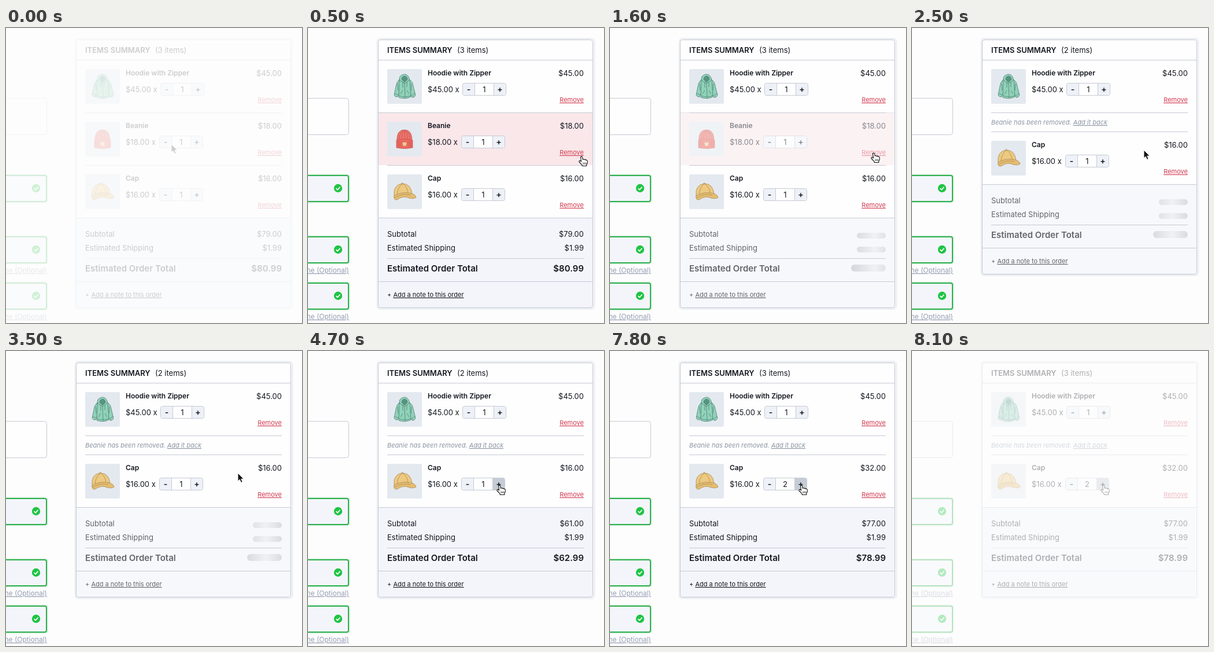
An HTML page that plays this animation: 512x510 px, repeating every 8200 ms.

```html
<!DOCTYPE html>
<html lang="en">
<head>
<meta charset="utf-8">
<title>Order summary</title>
<style>
  html, body { margin: 0; width: 100%; height: 100%; overflow: hidden; background: #fdfdfd; }
  svg { display: block; width: 512px; height: 510px; }
  text { font: 400 13px Inter, "Liberation Sans", sans-serif; fill: #14171f; white-space: pre; }
  .name { font-size: 12px; font-weight: 600; }
  .head { font-weight: 600; }
  .total { font-size: 15px; font-weight: 600; }
  .small { font-size: 11px; }
  .link { text-decoration: underline; }
  .remove { font-size: 11px; fill: #d33a50; text-decoration: underline; }
  .notice { font-size: 11px; font-style: italic; fill: #8a93a3; }
  .field { font-size: 12px; fill: #959db2; text-decoration: underline; }
  .sign { font-size: 14px; font-weight: 600; }
  .end { text-anchor: end; }
  .mid { text-anchor: middle; }
  .line { stroke: #c6cad3; fill: none; }
</style>
</head>
<body>
<svg viewBox="0 0 512 510">
  <defs>
    <linearGradient id="shimmer" gradientUnits="userSpaceOnUse" x1="0" y1="0" x2="80" y2="0" spreadMethod="repeat">
      <stop offset="0" stop-color="#f0f1f5"/>
      <stop offset=".45" stop-color="#d2d4da"/>
      <stop offset="1" stop-color="#f0f1f5"/>
    </linearGradient>
  </defs>
  <g id="stage"></g>
</svg>
<script>
const LOOP = 8200, SHIFT = 58;
const $ = id => document.getElementById(id);

const text = (x, y, str, cls = '', id = '') =>
  `<text x="${x}" y="${y}" class="${cls}" id="${id}">${str}</text>`;
const rect = (x, y, w, h, fill, extra = '') =>
  `<rect x="${x}" y="${y}" width="${w}" height="${h}" fill="${fill}" ${extra}/>`;
const rule = (y, x1 = 137, x2 = 477) => `<path class="line" d="M${x1} ${y + .5}H${x2}"/>`;

const art = {
  hoodie: `<g fill="#8fd2b9" stroke="#527f73" stroke-width=".8" stroke-linejoin="round">
    <path d="M21 18Q16 22 15 30L12 45Q14 49 18 48L23 35Z"/>
    <path d="M38 18Q44 21 45 29L49 45Q47 50 43 49L37 35Z"/>
    <path d="M21 18Q30 23 39 18L41 48Q31 53 20 49Z"/>
    <path d="M22 20Q19 13 26 10Q32 7 36 12Q40 17 37 20L30 25Z"/>
    <path d="M25 18Q25 13 30 12Q35 13 35 18L30 23Z" fill="#579482"/>
    <path d="M30 24L31 50M27 22V32M34 22V31M23 43L27 37M38 43L34 37M20 46Q31 50 41 46M13 42L19 45M43 46L48 42M18 25L19 37M42 25L41 37" fill="none"/></g>`,
  beanie: `<g fill="#ed756b" stroke="#b9504c" stroke-width=".7">
    <path d="M17 36Q15 14 30 14Q44 14 43 36Z"/>
    <path d="M20 34Q20 21 27 16M25 34Q24 22 29 15M30 34V15M35 34Q36 22 31 15M40 34Q40 21 33 16" fill="none"/>
    <path d="M16 32Q30 28 44 32V45Q30 48 16 45Z" fill="#ee6960"/>
    <path d="M19 33V44M22 33V44M38 33V44M41 33V44" fill="none"/>
    <path d="M26 35H34V39Q33 43 30 43Q27 43 26 39Z" fill="#f1c694"/></g>`,
  cap: `<g fill="#edc981" stroke="#a98b58" stroke-width=".8" stroke-linejoin="round">
    <path d="M12 37Q10 18 26 16Q41 16 43 34Q28 29 12 40Z"/>
    <path d="M12 37Q26 29 42 33Q49 35 50 40Q46 43 38 41Q28 36 17 44Q11 45 12 37Z" fill="#e5bd70"/>
    <path d="M26 16Q18 23 17 35M27 16Q35 22 36 32M13 41Q25 32 40 36" fill="none"/>
    <circle cx="26" cy="16" r="1.2"/></g>`
};

const stepper = (x, y, key) => `
  ${rect(x + .5, y + .5, 75, 21, '#fefefe', 'rx="3"')}
  <path d="M${x + 21} ${y + 1}H${x + 3}Q${x + 1} ${y + 1} ${x + 1} ${y + 3}V${y + 19}Q${x + 1} ${y + 21} ${x + 3} ${y + 21}H${x + 21}Z" fill="#eef1f8"/>
  <path id="${key}Plus" d="M${x + 54} ${y + 1}H${x + 73}Q${x + 75} ${y + 1} ${x + 75} ${y + 3}V${y + 19}Q${x + 75} ${y + 21} ${x + 73} ${y + 21}H${x + 54}Z" fill="#eef1f8"/>
  <path class="line" d="M${x + 21.5} ${y}V${y + 22}M${x + 54.5} ${y}V${y + 22}"/>
  ${rect(x + .5, y + .5, 75, 21, 'none', 'rx="3" stroke="#c6cad3"')}
  ${text(x + 11, y + 15.5, '-', 'sign mid')}${text(x + 38, y + 15.5, '1', 'mid', key + 'Qty')}${text(x + 65, y + 16, '+', 'sign mid')}`;

const item = (y, key, name, price, stepX) => `
  ${rect(137, y + 15, 60, 60, '#e4e9f0', 'rx="2"')}
  <g transform="translate(137 ${y + 15})">${art[key]}</g>
  ${text(207, y + 26, name, 'name')}
  ${text(207, y + 55, `$${price} x`)}
  ${stepper(stepX, y + 39, key)}
  ${text(477, y + 27, '$' + price, 'end', key + 'Price')}
  ${text(477, y + 72, 'Remove', 'remove end')}`;

const field = y => `
  ${rect(-10, y - 1, 82, 49, 'none', 'rx="5" stroke="#dff3e4" stroke-width="2"')}
  ${rect(-10, y + 1, 80, 45, '#f3f5fb', 'rx="3" stroke="#2aae4b" stroke-width="2"')}
  <circle cx="52" cy="${y + 23}" r="7.2" fill="#20c444"/>
  <path d="M48.6 ${y + 23.2}l2.5 2.5 4.4-5" fill="none" stroke="#fff" stroke-width="1.7"/>`;

const pill = (x, y, w, h) => rect(x, y, w, h, 'url(#shimmer)', `rx="${h / 2}"`);

$('stage').innerHTML = `
  ${rect(-10, 121.5, 80.5, 63, '#fefefe', 'rx="4" stroke="#c6cad3"')}
  ${[254, 360, 440].map(field).join('')}
  ${[423, 503].map(y => text(71, y, 'Line (Optional)', 'field end')).join('')}
  <rect id="halo" x="120" y="18.5" width="375" rx="5" fill="none" stroke="#edeff3" stroke-width="3"/>
  <rect id="panel" x="121.5" y="20.5" width="371" rx="4" fill="#fefefe"/>
  ${text(137, 43, 'ITEMS SUMMARY', 'head')}${text(258, 43, '(3 items)', '', 'count')}
  ${rule(55, 122, 492)}
  ${item(56, 'hoodie', 'Hoodie with Zipper', '45.00', 267)}
  <g id="beanie">
    <g id="hover">${rect(122, 147, 370, 90, '#f9e7ea')}${rule(146, 122, 492)}</g>
    ${item(147, 'beanie', 'Beanie', '18.00', 265)}
  </g>
  ${rule(146)}
  <g id="notice">${text(137, 167, 'Beanie has been removed. <tspan class="link">Add it back</tspan>', 'notice')}</g>
  <g id="lower">
    ${rect(122, 238, 370, 91, '#fefefe')}
    ${rule(237)}
    ${item(238, 'cap', 'Cap', '16.00', 265)}
    <path id="tint" d="M122 329H492V480Q492 484 488 484H126Q122 484 122 480Z"/>
    ${rule(328, 122, 492)}${rule(398)}${rule(438, 122, 492)}
    <g id="labels">
      ${text(137, 361, 'Subtotal')}${text(137, 385, 'Estimated Shipping')}
      ${text(137, 421, 'Estimated Order Total', 'total')}
      ${text(137, 465, '+ <tspan class="link">Add a note to this order</tspan>', 'small')}
    </g>
    <g id="sums">
      ${text(477, 361, '', 'end', 'subtotal')}${text(477, 385, '$1.99', 'end')}
      ${text(477, 421, '', 'total end', 'total')}
    </g>
    <g id="pills">${pill(427, 354, 50, 10)}${pill(427, 378, 50, 10)}${pill(417, 409, 60, 12)}</g>
  </g>
  <rect id="frame" x="121.5" y="20.5" width="371" rx="4" fill="none" stroke="#c3c8d2"/>
  <g id="cursor">
    <path id="arrow" d="M0 0V14.2L3.2 11.2L5.6 16.5L8.1 15.4L5.8 10.2H10.2Z" fill="#111" stroke="#fff" stroke-width="1"/>
    <path id="hand" d="M-1.5 1.2Q0-1 1.5 1.2L2.4 5.4Q4 4 5.2 5.8Q7 4.8 8 6.5Q10 6 10.3 8.2Q10.8 12 8.8 14.2V16.5H1.2V15Q-1 12.5-4 9.5Q-4.6 7-2.3 7.4L-.4 9Z" fill="#fff" stroke="#111" stroke-width="1.1" stroke-linejoin="round"/>
    <path id="knuckles" d="M3 10.5V14M5.2 10.5V14M7.3 10.5V14" stroke="#111" stroke-width=".8"/>
  </g>`;

// time, x, y of the pointer tip
const path = [
  [0, 286, 201], [400, 473, 222], [1000, 473, 222], [1600, 456, 216],
  [2300, 401, 211], [3700, 401, 211], [4500, 331, 232], [LOOP, 331, 232]
];
const ramp = (t, a, b) => Math.min(1, Math.max(0, (t - a) / (b - a)));
const ease = k => k * k * (3 - 2 * k);
const set = (id, name, value) => $(id).setAttribute(name, value);
const show = (id, k) => set(id, 'opacity', k);
const write = (id, str) => { if ($(id).textContent !== str) $(id).textContent = str; };

function pointer(t) {
  const i = path.findIndex((p, n) => n && t <= p[0]);
  const [a, x, y] = path[i - 1], [b, x2, y2] = path[i];
  const k = ease(ramp(t, a, b));
  return [x + (x2 - x) * k, y + (y2 - y) * k];
}

function draw(t) {
  show('stage', Math.min(.2 + .8 * ramp(t, 0, 400), 1 - ramp(t, 7820, 8240)));

  const gone = ease(ramp(t, 1750, 1950));
  const busy = Math.max(ramp(t, 1150, 1300) - ramp(t, 3540, 3640), ramp(t, 5050, 5150) - ramp(t, 5580, 5680));
  const done = t >= 5600;

  show('hover', ramp(t, 300, 400));
  show('beanie', (1 - .5 * ramp(t, 1150, 1350)) * (1 - gone));
  show('notice', gone);
  set('lower', 'transform', `translate(0 ${-SHIFT * gone})`);
  set('halo', 'height', 467 - SHIFT * gone);
  for (const id of ['panel', 'frame']) set(id, 'height', 463 - SHIFT * gone);

  write('count', t >= 1800 && !done ? '(2 items)' : '(3 items)');
  write('capQty', t >= 5050 ? '2' : '1');
  write('capPrice', done ? '$32.00' : '$16.00');
  write('subtotal', done ? '$77.00' : t > 1800 ? '$61.00' : '$79.00');
  write('total', done ? '$78.99' : t > 1800 ? '$62.99' : '$80.99');
  set('capPlus', 'fill', t > 4350 ? '#c6ccd6' : '#eef1f8');

  set('tint', 'fill', '#f3f5fb');
  set('tint', 'fill-opacity', 1 - .45 * busy);
  show('labels', 1 - .35 * busy);
  show('sums', 1 - busy);
  show('pills', busy);
  set('shimmer', 'gradientTransform', `translate(${(t / 1000 * 80 + 10) % 80} 0)`);

  const hand = (t > 320 && t < 1850) || t > 4350;
  const [x, y] = pointer(t);
  set('cursor', 'transform', `translate(${x} ${y})`);
  show('arrow', hand ? 0 : 1);
  show('hand', hand ? 1 : 0);
  show('knuckles', hand ? 1 : 0);
}

function tick() {
  draw(performance.now() % LOOP);
  requestAnimationFrame(tick);
}
tick();
</script>
</body>
</html>
```
